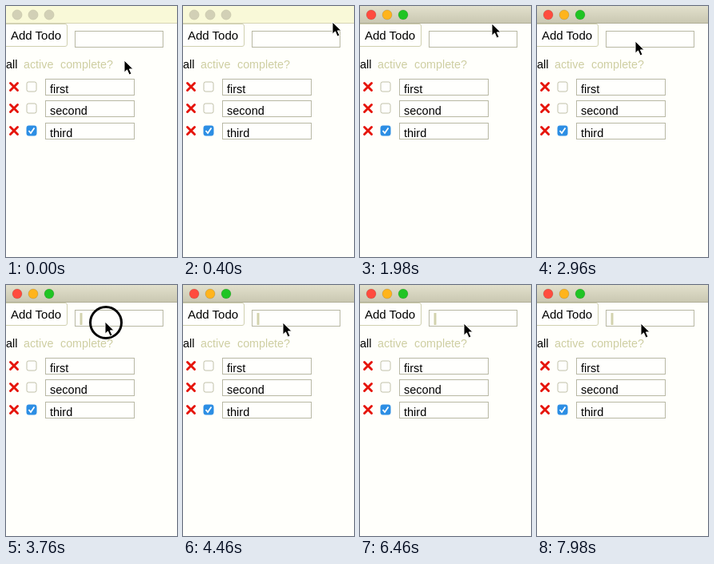
An HTML page that plays this animation: 214 by 314 pixels, repeating every 8 s.

```html
<!DOCTYPE html>
<html lang="en">
<head>
<meta charset="utf-8">
<title>Todo list</title>
<style>
  html, body { margin: 0; width: 100%; height: 100%; overflow: hidden; background: #fffffb; }
  svg { display: block; width: 214px; height: 314px; }
  text { font-family: "Liberation Sans", Arial, sans-serif; font-size: 14.5px; fill: #000; }
  .filter { font-size: 14.3px; }
  .muted { fill: #cecea2; }
  .field { fill: #fffffd; stroke: #b8b8a4; }
</style>
</head>
<body>
<svg viewBox="0 0 214 314">
  <defs>
    <linearGradient id="bar" x2="0" y2="1">
      <stop offset="0" stop-color="#e2e0cc"/>
      <stop offset="1" stop-color="#cac8b2"/>
    </linearGradient>
  </defs>
  <rect width="214" height="314" fill="#fffffb"/>
  <rect id="titleBar" width="214" height="21"/>
  <path id="titleEdge" d="M0 21.5H214"/>
  <g id="lights"></g>

  <rect x="-2.5" y="22.5" width="79" height="28" rx="2.5" fill="#fffffd" stroke="#d0d0b0"/>
  <text x="6" y="42" style="font-size:15px">Add Todo</text>
  <rect class="field" x="86.5" y="31.5" width="110" height="20"/>
  <path id="caret" d="M94 35V50" stroke="#d2d2ae" stroke-width="3"/>

  <text class="filter" x="0" y="78">all</text>
  <text class="filter muted" x="22" y="78">active</text>
  <text class="filter muted" x="68" y="78">complete?</text>
  <g id="rows"></g>

  <circle id="ring" r="19.5" fill="none" stroke="#000" stroke-width="3"/>
  <path id="pointer" d="M-1 0V15.2L2.5 11.9L5.2 18L8 16.8L5.4 10.9H10.2Z"
        fill="#000" stroke="#fffffb" stroke-width="1" stroke-linejoin="round"/>
</svg>
<script>
const LOOP = 8000;
const $ = id => document.getElementById(id);

const lightColors = ["#ff4c3e", "#ffb41c", "#20c424"];
$("lights").innerHTML = lightColors.map((_, i) =>
  `<circle cx="${14 + i * 20}" cy="11" r="6" stroke-width=".7"/>`).join("");

function row(label, i) {
  const done = label === "third";
  const box = done ? 'fill="#2c8ee4" stroke="#2c8ee4"' : 'fill="#fffffd" stroke="#c0c0a8"';
  const tick = done
    ? '<path d="M28.5 10L31 13L35.5 6.5" fill="none" stroke="#fff" stroke-width="1.8"/>' : "";
  return `<g transform="translate(0 ${Math.floor(91 + i * 27.5)})">
    <path d="M5.5 5.5L14.5 14.5M14.5 5.5L5.5 14.5" stroke="#e6140a" stroke-width="2.9" stroke-linecap="round"/>
    <rect x="26" y="4" width="12" height="12" rx="2.2" ${box}/>${tick}
    <rect class="field" x="49.5" y=".5" width="111" height="20"/>
    <text x="55" y="18">${label}</text></g>`;
}
$("rows").innerHTML = ["first", "second", "third"].map(row).join("");

// Pointer path: time, x, y
const path = [
  [20, 149, 68], [520, 190, 17], [820, 186, 10], [1840, 186, 10],
  [1980, 166, 22], [2520, 117, 40], [2800, 117, 40], [2960, 124, 44],
  [3340, 125, 46], [4320, 125, 46], [4460, 126, 47], [5320, 126, 47], [5460, 131, 48]
];
// Mouse presses: start, start of fade, end
const presses = [[1140, 1240, 1560], [3500, 4140, 4460]];

function pointerAt(t) {
  const next = path.findIndex(p => p[0] > t);
  if (next === 0) return path[0].slice(1);
  if (next < 0) return path[path.length - 1].slice(1);
  const [a, b] = [path[next - 1], path[next]];
  const u = (t - a[0]) / (b[0] - a[0]);
  const k = u * (2 - u);
  return [a[1] + (b[1] - a[1]) * k, a[2] + (b[2] - a[2]) * k];
}

function ringOpacity(t) {
  const press = presses.find(p => t >= p[0] && t < p[2]);
  return press ? Math.min(1, (press[2] - t) / (press[2] - press[1])) : 0;
}

function render(t) {
  const active = t >= 1240;
  $("titleBar").setAttribute("fill", active ? "url(#bar)" : "#f9f9d8");
  $("titleEdge").setAttribute("stroke", active ? "#b0ae98" : "#d6d4b6");
  [...$("lights").children].forEach((light, i) => {
    light.setAttribute("fill", active ? lightColors[i] : "#d2d0b6");
    light.setAttribute("stroke", active ? "#00000030" : "#c6c4aa");
  });
  $("caret").setAttribute("opacity", t >= 3560 ? 1 : 0);

  const [x, y] = pointerAt(t).map(Math.round);
  $("pointer").setAttribute("transform", `translate(${x} ${y})`);
  $("ring").setAttribute("transform", `translate(${x} ${y + 1})`);
  $("ring").setAttribute("opacity", ringOpacity(t));
}

const start = performance.now();
function tick() {
  render((performance.now() - start) % LOOP);
  requestAnimationFrame(tick);
}
tick();
</script>
</body>
</html>
```
